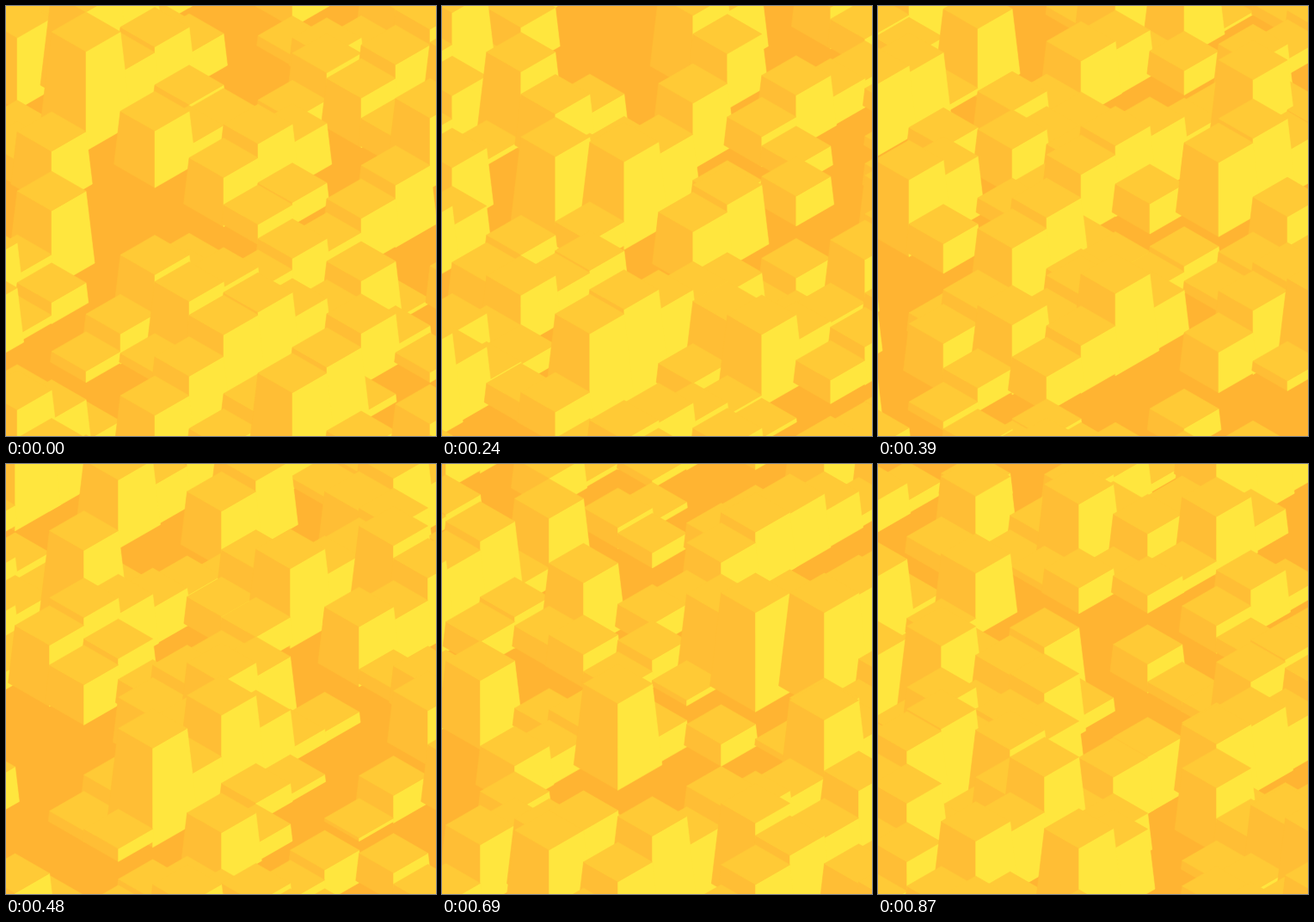
Animation of 500 by 500 pixels, one loop 0.9 s. Source, as an HTML page with a canvas:

```html
<!DOCTYPE html>
<html lang="en">
<head>
<meta charset="utf-8">
<title>Golden blocks</title>
<style>
  html, body { margin: 0; width: 100%; height: 100%; overflow: hidden; background: #ffb432; }
  canvas { display: block; width: 100%; height: 100%; }
</style>
</head>
<body>
<canvas id="stage" width="500" height="500"></canvas>
<script>
const ctx = document.getElementById('stage').getContext('2d');
const LOOP = 900, STEP = 30;
const W = 40, H = 23;            // half width and half height of a tile
const SPEED = 4.85;              // sideways drift per step
const FLARE = 0.12;              // blocks widen towards the floor
const FLOOR = '#ffb432', LEFT = '#ffbe35', TOP = '#ffca36', RIGHT = '#ffe63e';

function rand(a, b, c) {
  let n = Math.imul(a + 101, 374761393) ^ Math.imul(b + 211, 668265263) ^ Math.imul(c + 7, 1274126177);
  n = Math.imul(n ^ (n >>> 13), 1103515245);
  n = Math.imul(n ^ (n >>> 16), 2246822519);
  return ((n ^ (n >>> 15)) >>> 0) / 4294967296;
}

// Seeded swing between -1 and 1, with its own phase and pace.
function swing(a, b, seed, u) {
  const phase = rand(a, b, seed), pace = 0.8 + rand(a, b, seed + 1);
  return Math.sin(2 * Math.PI * (phase + pace * u));
}

// Broad waves make hills and open floor; short runs and single blocks break them up.
function height(a, b, t) {
  const u = t / LOOP;
  const wave = Math.sin(a * 0.9 + b * 0.5 + u * 7) + Math.sin(a * 0.4 - b * 1.1 - u * 5);
  const run = swing(Math.floor((a + (b & 1)) / 2), b, 10, u);
  const own = swing(a, b, 20, u);
  return Math.max(0, Math.min(108, 8 + 16 * wave + 52 * run + 38 * own));
}

function face(color, ...pts) {
  ctx.fillStyle = ctx.strokeStyle = color;
  ctx.beginPath();
  for (let i = 0; i < pts.length; i += 2) ctx.lineTo(pts[i], pts[i + 1]);
  ctx.closePath();
  ctx.fill();
  ctx.stroke();
}

function block(x, y, h) {
  const f = h * FLARE, top = y - h, front = top + H, foot = y + H + f * H / W;
  face(LEFT, x, front, x - W, top, x - W - f, y, x, foot);
  face(RIGHT, x, front, x + W, top, x + W + f, y, x, foot);
  face(TOP, x, top - H, x + W, top, x, front, x - W, top);
}

function draw(t) {
  const shift = SPEED * t / STEP;
  ctx.fillStyle = FLOOR;
  ctx.fillRect(0, 0, 500, 500);
  ctx.lineWidth = 0.6;
  ctx.lineJoin = 'round';
  // Rows run from back to front.
  for (let row = -2; row <= 32; row++) {
    for (let col = -6; col <= 14; col++) {
      if ((col + row) & 1) continue;
      const h = height((col - row) / 2, (col + row) / 2, t);
      if (h > 3) block(13 + shift + col * W, row * H - shift * H / W, h);
    }
  }
}

let shown = -1;
function tick() {
  const t = Math.floor((performance.now() % LOOP) / STEP) * STEP;
  if (t !== shown) draw(shown = t);
  requestAnimationFrame(tick);
}
tick();
</script>
</body>
</html>
```
